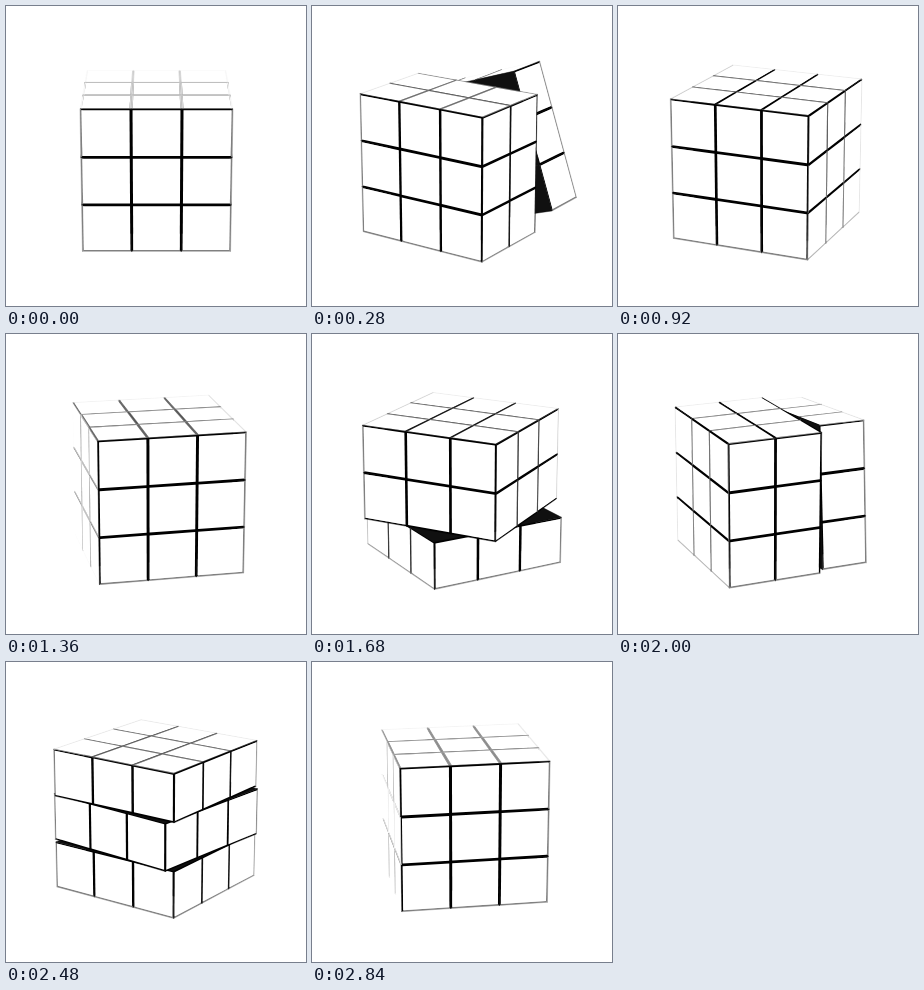
Recreate the animation shown at these times as an HTML page with a canvas. Size 300 by 300 pixels, loop 2.88 s.

```html
<!DOCTYPE html>
<html lang="en">
<head>
<meta charset="utf-8">
<title>Turning cube</title>
<style>
  html, body { margin: 0; width: 100%; height: 100%; overflow: hidden; background: #fff; }
  canvas { display: block; width: 300px; height: 300px; }
</style>
</head>
<body>
<canvas id="stage" width="300" height="300"></canvas>
<script>
const ctx = document.getElementById('stage').getContext('2d');

const STEP = 40, STEPS = 72, STEPS_PER_MOVE = 12, TWIST_STEPS = 10.5;
const YAW_STEP = -2 * Math.PI / 73;
const PITCH = Math.PI / 10, DISTANCE = 20, FOCAL = 1434;
const CENTER_X = 150.5, CENTER_Y = 152;
const HALF = 1 / 3, BORDER = 0.02;
const X = 0, Y = 1, Z = 2;

// Quarter turns in order: axis, layer and direction
const MOVES = [
  [Z, -1, -1], [Y, 1, 1], [Z, 0, -1],
  [Y, -1, 1], [Z, 1, -1], [Y, 0, -1]
];

const clamp = v => Math.max(0, Math.min(1, v));
const mix = (a, b, t) => a + (b - a) * t;
const smooth = (from, to, v) => {
  const t = clamp((v - from) / (to - from));
  return t * t * (3 - 2 * t);
};
const ease = t => t * t * t * (10 + t * (6 * t - 15));
const dot = (a, b) => a[0] * b[0] + a[1] * b[1] + a[2] * b[2];
const minus = (a, b) => a.map((v, i) => v - b[i]);
const unit = (axis, sign) => [0, 1, 2].map(i => i === axis ? sign : 0);

function rotate(p, axis, angle) {
  const c = Math.cos(angle), s = Math.sin(angle);
  const u = (axis + 1) % 3, v = (axis + 2) % 3;
  const out = p.slice();
  out[u] = p[u] * c - p[v] * s;
  out[v] = p[u] * s + p[v] * c;
  return out;
}

function project(p) {
  const [x, y, z] = rotate(p, X, PITCH);
  const scale = FOCAL / (DISTANCE - z);
  return [CENTER_X + x * scale, CENTER_Y - y * scale];
}

const CAMERA = rotate([0, 0, DISTANCE], X, -PITCH);

// Cosine between a direction and the line from a point to the camera
function facingAt(direction, point) {
  const toCamera = minus(CAMERA, point);
  return dot(direction, toCamera) / Math.hypot(...toCamera);
}

function fillShape(points, level, outline) {
  ctx.beginPath();
  points.forEach(p => ctx.lineTo(...project(p)));
  ctx.closePath();
  ctx.fillStyle = ctx.strokeStyle = `rgb(${level},${level},${level})`;
  ctx.fill();
  if (outline) {
    ctx.lineWidth = 0.4;
    ctx.stroke();
  }
}

// Grey level of a groove: black on the front, washed out at grazing angles,
// darker again along the grooves that recede from the viewer
function grooveLevel({ facing, up, receding, silhouette, yaw }) {
  const frontness = smooth(0.08, 0.6, facing);
  let side = 255 * (1 - frontness);
  let top = 215 - 100 * Math.abs(Math.sin(2 * yaw));
  if (receding) {
    side = Math.min(side, 255 * (1 - smooth(0.1, 0.3, facing)));
    top = Math.min(top, 255 * Math.cos(4 * yaw) ** 2);
  }
  const level = mix(side, top, up);
  return Math.round(silhouette ? mix(level, 255, 0.9 - 0.4 * frontness) : level);
}

function drawFace(cell, axis, sign, place, yaw) {
  const center = cell.map(v => v * 2 * HALF);
  const normal = place(unit(axis, sign));
  center[axis] += sign * HALF;
  const middle = place(center);
  const facing = facingAt(normal, middle);
  if (facing <= 0) return;

  const [u, v] = [(axis + 1) % 3, (axis + 2) % 3];
  const corners = size => [[-1, -1], [1, -1], [1, 1], [-1, 1]].map(([a, b]) => {
    const p = center.slice();
    p[u] += a * size;
    p[v] += b * size;
    return place(p);
  });
  const outer = corners(HALF);
  if (cell[axis] !== sign) {
    fillShape(outer, 16, true);
    return;
  }

  const inner = corners(HALF - BORDER);
  const up = Math.max(0, normal[Y]) ** 4;
  const steepness = a => Math.abs(facingAt(place(unit(a, 1)), middle));
  [[v, -1], [u, 1], [v, 1], [u, -1]].forEach(([across, edge], i) => {
    const next = (i + 1) % 4;
    const along = across === u ? v : u;
    const level = grooveLevel({
      facing, up, yaw,
      receding: steepness(across) < steepness(along),
      silhouette: cell[across] === edge && facingAt(place(unit(across, edge)), outer[i]) <= 0
    });
    fillShape([outer[i], outer[next], inner[next], inner[i]], level, true);
  });
  fillShape(inner, 255);
}

function drawCube(step) {
  const yaw = step * YAW_STEP;
  const [axis, layer, turn] = MOVES[Math.floor(step / STEPS_PER_MOVE)];
  const progress = clamp((step % STEPS_PER_MOVE) / TWIST_STEPS);
  const twist = turn * ease(progress) * Math.PI / 2;
  const eye = rotate(CAMERA, Y, -yaw)[axis];

  ctx.fillStyle = '#fff';
  ctx.fillRect(0, 0, 300, 300);

  // Layers are separated by planes, so paint them one by one, farthest first
  const gap = index => Math.abs(index * 2 * HALF - eye);
  for (const index of [-1, 0, 1].sort((a, b) => gap(b) - gap(a))) {
    const angle = index === layer ? twist : 0;
    const place = p => rotate(rotate(p, axis, angle), Y, yaw);
    const cubies = [];
    for (const a of [-1, 0, 1]) {
      for (const b of [-1, 0, 1]) {
        const cell = unit(axis, index);
        cell[(axis + 1) % 3] = a;
        cell[(axis + 2) % 3] = b;
        const center = place(cell.map(v => v * 2 * HALF));
        cubies.push({ cell, distance: Math.hypot(...minus(CAMERA, center)) });
      }
    }
    cubies.sort((a, b) => b.distance - a.distance);
    for (const { cell } of cubies) {
      for (const side of [X, Y, Z]) {
        drawFace(cell, side, -1, place, yaw);
        drawFace(cell, side, 1, place, yaw);
      }
    }
  }
}

const start = performance.now();
function tick() {
  const elapsed = Math.max(0, performance.now() - start);
  drawCube(Math.floor(elapsed / STEP) % STEPS);
  requestAnimationFrame(tick);
}
tick();
</script>
</body>
</html>
```
